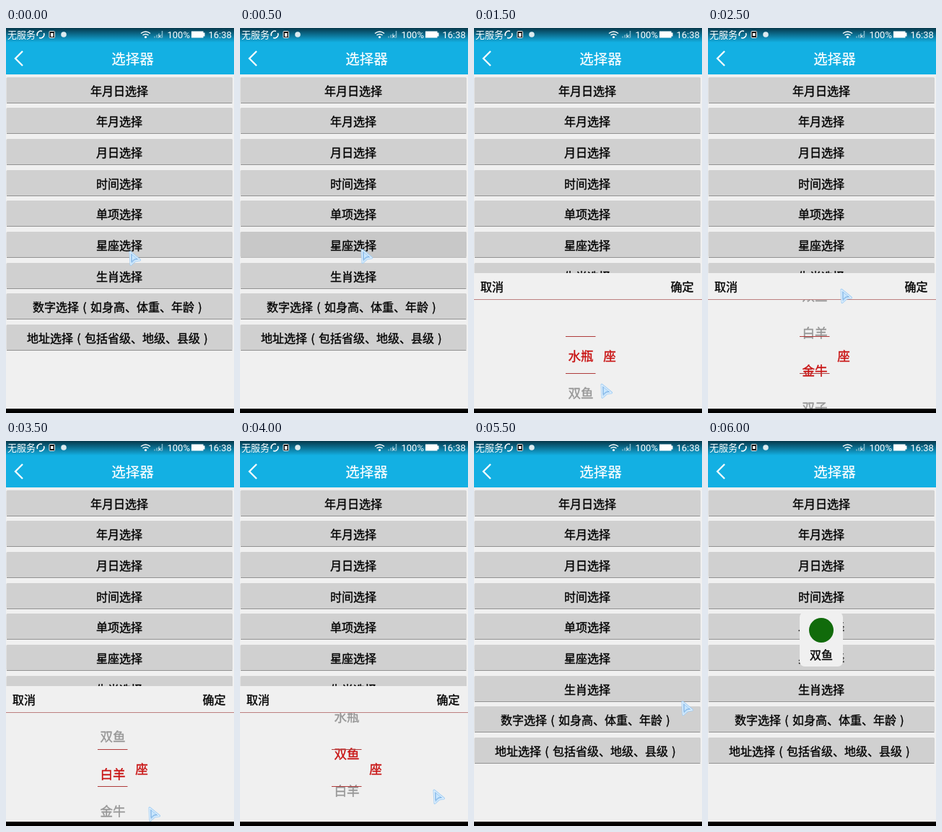
An HTML page that plays this animation: 316 by 531 pixels, repeating every 6500 ms.

```html
<!DOCTYPE html>
<html lang="zh-CN">
<head>
<meta charset="utf-8">
<style>
  html, body { margin: 0; width: 100%; height: 100%; overflow: hidden; background: #f0f0f0; }
  svg { display: block; width: 316px; height: 531px; }
  text {
    font-family: "Noto Sans CJK SC", "Noto Sans CJK", sans-serif; font-size: 16px;
    fill: currentColor; stroke: currentColor; stroke-width: .35px;
  }
  .mid { text-anchor: middle; }
  .status { font-family: Roboto, "Noto Sans CJK SC", "Noto Sans CJK", sans-serif; font-size: 13px; color: #fff; stroke: none; }
  .title { font-size: 19.5px; color: #fff; stroke-width: .2px; }
  .line { fill: none; stroke: #fff; }
  .item { font-size: 17.6px; text-anchor: middle; }
</style>
</head>
<body>
<svg viewBox="0 0 316 531">
  <defs>
    <linearGradient id="shade" x2="0" y2="1">
      <stop stop-color="#06384b"/><stop offset="1" stop-color="#13b0e3"/>
    </linearGradient>
    <clipPath id="wheelClip"><rect y="375" width="316" height="150"/></clipPath>
  </defs>
  <rect width="316" height="531" fill="#f0f0f0"/>

  <rect width="316" height="64" fill="#13b0e3"/>
  <rect width="316" height="20" fill="url(#shade)"/>
  <text class="status" x="2" y="14">无服务</text>
  <path class="line" stroke-width="1.5" d="M43.5 11A5 5 0 0 1 50 4.5M52.5 7A5 5 0 0 1 46 13.5"/>
  <rect x="60" y="4.500" width="7.500" height="9" rx="1" fill="#111" stroke="#eee"/>
  <rect id="blink" x="62" y="7" width="3.500" height="5" fill="#fff"/>
  <circle cx="80" cy="9" r="3.800" fill="#dcebf0"/>
  <path class="line" stroke-width="1.5" d="M187 7.500Q193.500 2.500 200 7.500M189.500 10Q193.500 7 197.500 10"/>
  <circle cx="193.500" cy="12.500" r="1.600" fill="#fff"/>
  <path d="M206 13.500v-2M209 13.500v-4M212 13.500v-6M216.500 13.500V4" stroke="#7fb7ca" stroke-width="1.5"/>
  <path class="line" d="M211 9.500l4 4m0-4l-4 4"/>
  <text class="status" x="223.500" y="13.500">100%</text>
  <path d="M257 4.500h16.500v2h2v5h-2v2H257z" fill="#fff"/>
  <text class="status" x="280.500" y="13.500">16:38</text>
  <path class="line" stroke-width="2.3" d="M23 32L13 42L23 52"/>
  <text class="mid title" x="175.500" y="49.500">选择器</text>

  <g id="buttons"></g>

  <g id="sheet">
    <rect y="338" width="316" height="188" fill="#f0f0f0"/>
    <text x="9" y="363">取消</text>
    <text x="272.500" y="363">确定</text>
    <path d="M-3 374.500H319" stroke="#bd8080"/>
    <g id="wheel" clip-path="url(#wheelClip)"></g>
    <path d="M127 425.500H168.500M127 476.500H168.500" stroke="#b03c3c"/>
    <text class="item" x="188" y="458.500" color="#c81010">座</text>
  </g>

  <g id="toast">
    <rect x="127" y="236" width="60" height="75" rx="7" fill="#f0f0f0"/>
    <circle cx="157" cy="261" r="17" fill="#116b0b"/>
    <text class="mid" x="157" y="300.500">双鱼</text>
  </g>
  <rect y="525" width="316" height="6" fill="#000"/>
  <g id="cursor" stroke-linejoin="round">
    <path d="M2 2L15.500 13L9 14L3 19.500Z" fill="#c9e6fd" stroke="#a5d0f5" stroke-width="3"/>
    <path d="M2 2L15.500 13L9 14L3 19.500Z" fill="none" stroke="#f4faff"/>
    <path d="M4 5V15.500L8 12L12 11.500" fill="none" stroke="#78ade2"/>
  </g>
</svg>
<script>
const $ = id => document.getElementById(id);

function add(parent, tag, attrs, text = "") {
  const el = document.createElementNS("http://www.w3.org/2000/svg", tag);
  for (const name in attrs) el.setAttribute(name, attrs[name]);
  el.textContent = text;
  parent.append(el);
  return el;
}

// Centre each bracket in a full-width cell, using third-em spaces.
const padBrackets = text => text.replace(/[()]/g, "\u2004$&\u2004");

const buttons = ["年月日选择", "年月选择", "月日选择", "时间选择", "单项选择", "星座选择", "生肖选择",
  "数字选择(如身高、体重、年龄)", "地址选择(包括省级、地级、县级)"].map((label, i) => {
  const y = Math.floor(68 + i * 42.67 + 0.01);
  const face = add($("buttons"), "rect", { x: 0.5, y, width: 313.5, height: 35, rx: 1.5 });
  const edge = add($("buttons"), "path", { d: `M1 ${y + 35.5}H313.5` });
  add($("buttons"), "text", { class: "mid", x: 157, y: y + 24.5 }, padBrackets(label));
  return { face, edge };
});

const items = ["水瓶", "双鱼", "白羊", "金牛", "双子", "巨蟹"].map(name =>
  add($("wheel"), "text", { class: "item", x: 148 }, name));

// One pose per half second; wheel is the position in the list of signs.
const poses = [
  { cursor: [170, 307] },
  { cursor: [167, 304], pressed: true },
  { cursor: [167, 304], wheel: 0, opacity: 0.91, scale: 0.985 },
  { cursor: [175, 490], wheel: 0 },
  { cursor: [176, 332], wheel: 3, blink: true },
  { cursor: [183, 359], wheel: 2.61, blink: true },
  { cursor: [182, 420], wheel: 2, blink: true },
  { cursor: [197, 504], wheel: 1.86, blink: true },
  { cursor: [267, 480], wheel: 1.4 },
  { cursor: [285, 364], wheel: 1, blink: true },
  { cursor: [287, 358], wheel: 1 },
  { cursor: [287, 358], blink: true },
  { toast: true, blink: true }
];

const show = (el, visible) => el.style.display = visible ? "" : "none";

function render(time) {
  const { cursor, wheel, opacity = 1, scale = 1, pressed, blink, toast } =
    poses[Math.floor(time % 6500 / 500)];

  buttons.forEach(({ face, edge }, i) => {
    const down = pressed && i === 5;
    face.setAttribute("fill", down ? "#c8c8c8" : "#d0d0d0");
    edge.setAttribute("stroke", down ? "#b8b8b8" : "#929292");
  });

  const open = wheel !== undefined;
  show($("sheet"), open);
  if (open) {
    $("sheet").setAttribute("opacity", opacity);
    $("sheet").setAttribute("transform", `translate(157 432) scale(${scale}) translate(-157 -432)`);
    items.forEach((el, i) => {
      el.setAttribute("y", 458.5 + (i - wheel) * 51.3);
      el.setAttribute("color", i === Math.round(wheel) ? "#c81010" : "#969696");
    });
  }

  show($("toast"), toast);
  show($("cursor"), cursor);
  if (cursor) $("cursor").setAttribute("transform", `translate(${cursor})`);
  $("blink").setAttribute("height", blink ? 4 : 5);
}

const start = performance.now();
function tick() {
  render(performance.now() - start);
  requestAnimationFrame(tick);
}
tick();
</script>
</body>
</html>
```
